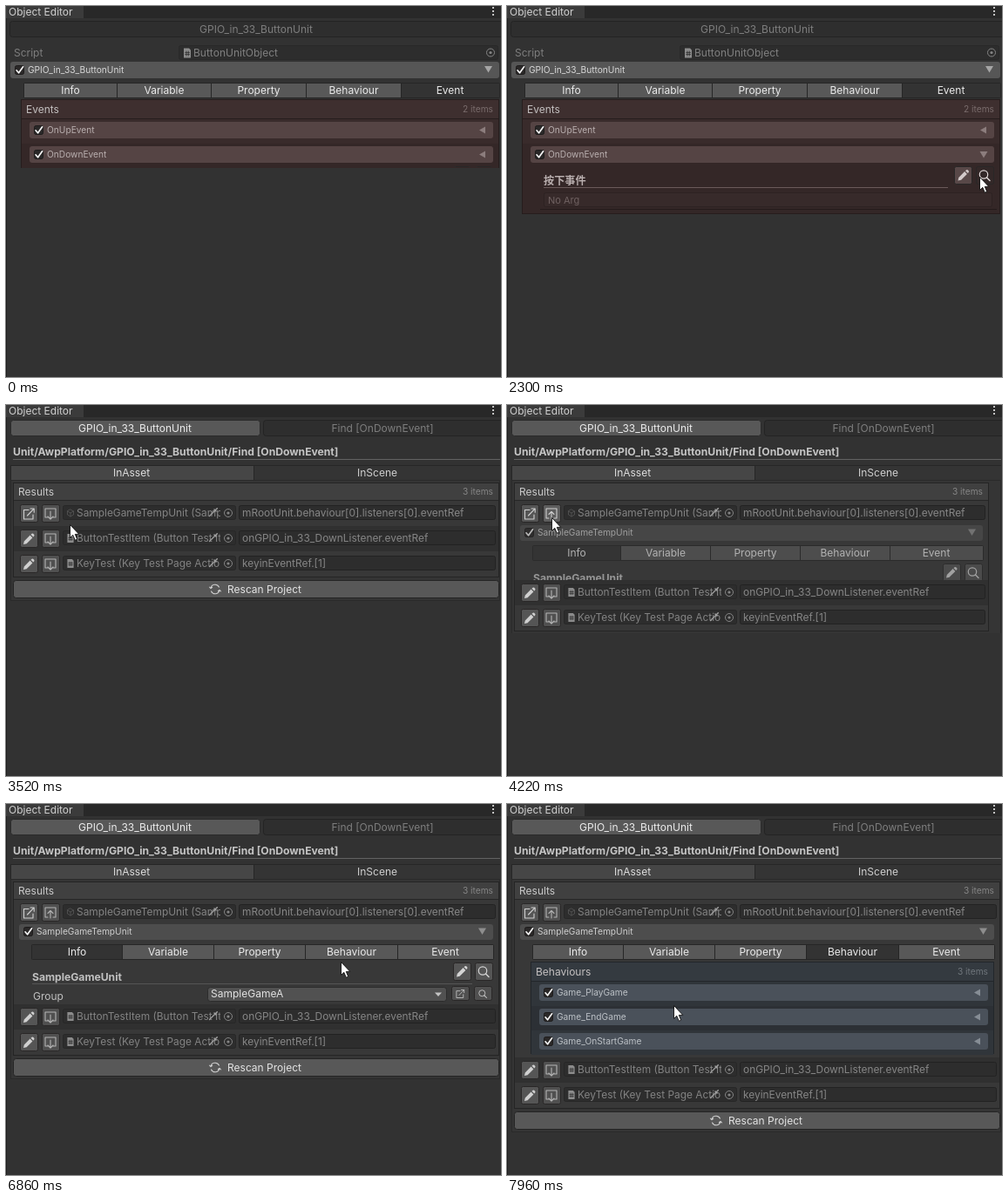
An HTML page for the animation above (8000 ms loop, 568x426 px).

```html
<!DOCTYPE html>
<html lang="en">
<head>
<meta charset="utf-8">
<title>Object Editor</title>
<style>
html, body { margin: 0; width: 100%; height: 100%; overflow: hidden; background: #323232; }
svg { display: block; }
#stage { width: 568px; height: 426px; font: 12px Inter, "Noto Sans CJK SC", "Noto Sans CJK", sans-serif; }
text { white-space: pre; }
</style>
</head>
<body>
<svg id="stage" viewBox="0 0 568 426"></svg>
<script>
const stage = document.getElementById('stage');
const LOOP = 8000, START = 578, STEP = 100.9;

const clamp = v => Math.max(0, Math.min(1, v));
const ramp = (u, from, span) => clamp((u - from) / span);

// Pointer way points: time, x, y
const TRACK = [
  [590, 557, 48], [690, 545, 88], [800, 518, 138], [900, 487, 169], [1500, 486, 169],
  [1600, 513, 183], [1700, 537, 195], [1800, 537, 195], [1900, 543, 196], [3010, 543, 196],
  [3110, 505, 190], [3220, 395, 172], [3320, 265, 156], [3420, 150, 143], [3520, 73, 137],
  [3620, 60, 134], [3820, 52, 129], [5030, 52, 129], [5135, 54, 129], [5240, 57, 130],
  [5340, 84, 135], [5540, 235, 142], [5740, 395, 122], [5840, 413, 113], [5940, 384, 111],
  [6140, 328, 114], [6340, 342, 105], [6550, 370, 145], [6750, 386, 178], [6852, 385, 181],
  [7060, 384, 171], [7760, 384, 171], [7862, 290, 204], [7963, 192, 231]
];

function pointerAt(u) {
  let i = 1;
  while (i < TRACK.length - 1 && TRACK[i][0] < u) i++;
  const [t0, x0, y0] = TRACK[i - 1], [t1, x1, y1] = TRACK[i];
  const k = ramp(u, t0, t1 - t0);
  return [Math.round(x0 + (x1 - x0) * k), Math.round(y0 + (y1 - y0) * k)];
}

// Basic shapes
const box = (x, y, w, h, fill, r = 0, line = '') =>
  line
    ? `<rect x="${x + .5}" y="${y + .5}" width="${w - 1}" height="${h - 1}" rx="${r}" fill="${fill}" stroke="${line}"/>`
    : `<rect x="${x}" y="${y}" width="${w}" height="${h}" rx="${r}" fill="${fill}"/>`;
const label = (x, y, s, fill, size = 12, more = '') =>
  `<text x="${x}" y="${y}" fill="${fill}" font-size="${size}" ${more}>${s}</text>`;
const mid = (x, y, s, fill) => label(x, y, s, fill, 12, 'text-anchor="middle"');
const right = (x, y, s, fill) => label(x, y, s, fill, 10.2, 'text-anchor="end"');
const bold = (x, y, s, fill) => label(x, y, s, fill, 12.15, 'font-weight="700"');
const move = (x, y, s) => `<g transform="translate(${x} ${y})">${s}</g>`;
const stroke = (d, c, w = 1.1) =>
  `<path d="${d}" fill="none" stroke="${c}" stroke-width="${w}" stroke-linecap="round" stroke-linejoin="round"/>`;
const solid = (d, c) => `<path d="${d}" fill="${c}"/>`;
const clip = (x, y, w, h, s) =>
  h <= 0 ? '' : `<svg x="${x}" y="${y}" width="${w}" height="${h}" viewBox="${x} ${y} ${w} ${h}">${s}</svg>`;

// Icons, centred on 0,0
const ICON = {
  pencil: c => solid('M-6 6L-5.2 2.4L1.6 -4.4L4.4 -1.6L-2.4 5.2ZM2.5 -5.3L3.6 -6.3Q4.4 -6.8 5.2 -6.2L6.2 -5.2Q6.8 -4.4 6.2 -3.6L5.3 -2.5Z', c),
  pen: c => stroke('M-4.5 4.5L2 -2', c, 1.3) + stroke('M1 -3L3 -1M3 -3L4.3 -4.3', c, 1.5),
  search: c => `<circle cx="-1" cy="-1" r="4.7" fill="none" stroke="${c}" stroke-width="1.2"/>` + stroke('M2.5 2.5L6 6', c, 1.4),
  link: c => stroke('M0 -4.5H-5.5V6H5V1M-1.5 2L6 -5.8M2 -6H6.2V-1.8', c),
  down: c => stroke('M-3 4H-6V-6H6V4H3M0 -3V6M-3 3L0 6.2L3 3', c),
  up: c => stroke('M-3 5H-6V-6H6V5H3M0 6V-2.5M-3 .5L0 -2.7L3 .5', c),
  target: c => `<circle r="4.5" fill="none" stroke="${c}"/><circle r="1.6" fill="${c}"/>`,
  script: c => solid('M-4 -5.5H2L4 -3.5V5.5H-4Z', c) + stroke('M-1 -2V3M1.3 -2V3M-2.3 -.6H2.5M-2.3 1.6H2.5', '#2d2d2d', .8),
  cube: c => stroke('M0 -4L3.5 -2V2L0 4L-3.5 2V-2ZM-3.5 -2L0 0L3.5 -2M0 0V4', c, .7),
  reload: c => stroke('M-5 -1.2A5 5 0 0 1 4.4 -2.4M5 1.2A5 5 0 0 1 -4.4 2.4M-6.4 -2.4L-5 -.8L-3.4 -2.2M6.4 2.4L5 .8L3.4 2.2', c)
};
const icon = (name, x, y, c, k = 1) => `<g transform="translate(${x} ${y}) scale(${k})">${ICON[name](c)}</g>`;
const button = (name, cx, cy, bg, c, w = 21, h = 21, k = 1) =>
  box(Math.round(cx - w / 2), Math.floor(cy - h / 2), w, h, bg, 2, '#292727') + icon(name, cx, cy, c, k);
const field = (x, y, w, line) => box(x, y, w, 17, '#2d2d2d', 2, line);

const foldOpen = (x, y, c) => solid(`M${x - 4.5} ${y - 3.5}h9l-4.5 7.5z`, c);
const foldShut = (x, y, c) => solid(`M${x + 3} ${y - 4}v8l-7 -4z`, c);
const check = (x, y) => box(x - 5.5, y - 5.5, 11, 11, '#2a2828', 2, '#1d1b1b') +
  stroke(`M${x - 3.5} ${y + .3}l2.6 3l5 -7`, '#f4f4f4', 1.7);

const TABS = ['Info', 'Variable', 'Property', 'Behaviour', 'Event'];
function tabs(x, y, w, active) {
  const cut = [0, .196, .395, .594, .794, 1].map(k => Math.round(x + w * k));
  return box(x - 1, y - 1, w + 2, 18, '#262626', 2) + TABS.map((s, i) =>
    box(cut[i], y, cut[i + 1] - cut[i] - (i < 4), 16, i === active ? '#333' : '#585858') +
    mid((cut[i] + cut[i + 1]) / 2 - .5, y + 12, s, '#eaeaea')).join('');
}

const RED = { line: '#261d1d', head: '#3e2f2f', odd: '#392b2b', even: '#342727', bar: '#554444', text: '#b9afaf', dim: '#7a6c6c', arrow: '#8c7d7d' };
const BLUE = { line: '#22262a', head: '#343a40', odd: '#30353a', even: '#2c3035', bar: '#4a515a', text: '#bcc1c6', dim: '#70767c', arrow: '#868d95' };

// Titled list of foldable entries
function list(x, y, w, h, title, items, c, openLast) {
  const end = x + w;
  return box(x, y, w, h, c.even, 0, c.line) +
    box(x + 1, y + 1, w - 2, 21, c.head) + box(x + 1, y + 22, w - 2, 1, c.line) +
    label(x + 6, y + 16, title, '#c4c0c0') + right(end - 7, y + 15, items.length + ' items', c.dim) +
    items.map((s, i) => {
      const top = y + 23 + i * 28, cy = top + 12.5;
      const fold = openLast && i === items.length - 1 ? foldOpen : foldShut;
      return box(x + 1, top, w - 2, 28, i % 2 ? c.even : c.odd) +
        box(x + 10, cy - 9.5, w - 17, 19, c.bar, 3) + check(x + 20.5, cy) +
        label(x + 30, cy + 3.5, s, c.text, 10.2) + fold(end - 19, cy, c.arrow);
    }).join('');
}

function windowBar() {
  return box(0, 0, 568, 426, '#323232') + box(0, 0, 568, 14, '#282828') +
    box(0, 0, 89, 14, '#3b3b3b') + box(0, 14, 1, 412, '#1f1f1f') +
    label(3, 11, 'Object Editor', '#d0d0d0') +
    [1, 5, 9].map(y => box(558, y, 2, 2, '#c4c4c4')).join('');
}

function unitPage(u) {
  const grow = Math.round(53 * ramp(u, 900, 395));
  const pressed = u > 2150, hover = u > 1850;
  const detail = bold(42, 205, '按下事件', '#b9afaf') +
    box(42, 208, 464, 1, '#6a5a5a') +
    button('pencil', 523.5, 194.5, '#584848', '#d2caca') +
    button('search', 548, 194.5, pressed ? '#332828' : '#584848', hover ? '#e2dada' : '#c4baba') +
    box(42, 214, 515, 17, '#372a2a', 2, '#2d2222') + label(47, 227, 'No Arg', '#6f6161', 11) +
    box(38, 233, 524, 1, '#241b1b');
  return box(4, 17, 568, 19, '#2e2e2e', 3, '#232323') +
    mid(287, 31, 'GPIO_in_33_ButtonUnit', '#7e7e7e') +
    label(9, 58, 'Script', '#7e7e7e') + field(198, 45, 367, '#292929') +
    icon('script', 208, 54, '#8c8c8c') + label(215, 58, 'ButtonUnitObject', '#808080') +
    icon('target', 556, 53.5, '#858585') +
    box(5, 64, 561, 19, '#565656', 3) + check(15.5, 73.5) +
    label(25, 77, 'GPIO_in_33_ButtonUnit', '#d8d8d8', 10.2) + foldOpen(553.5, 72.5, '#a6a6a6') +
    tabs(21, 89, 545, 4) +
    list(17, 107, 549, 79 + grow, 'Events', ['OnUpEvent', 'OnDownEvent'], RED, grow > 0) +
    clip(18, 183, 547, grow + 2, detail);
}

const ROWS = [
  ['link', 'cube', 'SampleGameTempUnit (Sample Game Temp Unit)', 'mRootUnit.behaviour[0].listeners[0].eventRef'],
  ['pencil', 'script', 'ButtonTestItem (Button Test Item)', 'onGPIO_in_33_DownListener.eventRef'],
  ['pencil', 'script', 'KeyTest (Key Test Page Action)', 'keyinEventRef.[1]']
];

function resultRow(i, dy, edge, open, hover) {
  const [act, kind, name, ref] = ROWS[i], y = 110 + 29 * i + dy;
  return box(9, y, edge - 10, 29, i % 2 ? '#303030' : '#383838') +
    button(act, 26, y + 15, '#555', '#d0d0d0') +
    button(open ? 'up' : 'down', 51, y + 15, hover ? '#5e5e5e' : '#505050', hover ? '#d0d0d0' : '#b4b4b4') +
    field(65, y + 5, 199, '#272727') +
    icon(kind, 74, y + 14, kind === 'cube' ? '#5c5c5c' : '#8c8c8c', kind === 'cube' ? 1 : .9) +
    clip(81, y, 165, 29, label(81, y + 18, name, '#838383', 11.9)) +
    icon('pen', 238, y + 13, '#a0a0a0') + icon('target', 255, y + 14, '#858585') +
    field(267, y + 5, edge - 271, '#222') + label(271, y + 18, ref, '#868686', 11.9);
}

function infoPane(end) {
  return bold(30, 203, 'SampleGameUnit', '#c0c0c0') + box(30, 206, end - 54, 1, '#555') +
    button('pencil', end - 36, 192.5, '#555', '#d4d4d4') + button('search', end - 11, 192.5, '#555', '#d4d4d4') +
    label(31, 225, 'Group', '#c0c0c0') +
    box(231, 210, end - 284, 17, '#515151', 3, '#2c2c2c') + label(235, 222, 'SampleGameA', '#e2e2e2') +
    solid(`M${end - 67} 216.5h8l-4 4.5z`, '#c4c4c4') +
    button('link', end - 38, 218, '#505050', '#c8c8c8', 21, 17, .75) +
    button('search', end - 12, 218, '#505050', '#c8c8c8', 21, 17, .75);
}

const unfold = u => Math.round(91 * ramp(u, 3966, 382));

function findPage(u) {
  const opening = u > 3950 && u < 4400;
  const edge = opening ? 553 : 566, end = edge - 7;
  const swap = ramp(u, 7200, 350);
  const open = u > 3900, hover = u > 3780 && u < 5300;
  const dy = unfold(u) + Math.round(61 * swap);
  const slide = Math.round(532 * swap);

  const info = swap < 1 ? move(-slide, 0, infoPane(end)) : '';
  const behaviours = swap > 0 ? move(532 - slide, 0,
    list(27, 181, 532, 106, 'Behaviours', ['Game_PlayGame', 'Game_EndGame', 'Game_OnStartGame'], BLUE)) : '';
  const editor = box(15, 138, end - 15, 18, '#4d4d4d', 3) + check(25.5, 146.5) +
    label(35, 150, 'SampleGameTempUnit', '#cecece', 10.2) + foldOpen(end - 12.5, 146, '#8e8e8e') +
    tabs(30, 162, end - 30, swap > 0 ? 3 : 0) +
    clip(27, 180, end - 26, 110, info + behaviours);

  const table = box(5, 86, 562, 139 + dy, '#353535', 0, '#2a2a2a') +
    box(8, 89, edge - 8, 109 + dy, '#383838', 0, '#242424') +
    box(9, 90, edge - 10, 19, '#404040') + box(9, 109, edge - 10, 1, '#272727') +
    label(14, 104, 'Results', '#cacaca') + right(end, 103, '3 items', '#858585') +
    resultRow(0, 0, edge, open, hover) +
    clip(9, 136, edge - 10, dy + 3,
      box(9, 136, 560, 160, '#383838') + `<g opacity="${unfold(u) / 91}">${editor}</g>`) +
    resultRow(1, dy, edge) + resultRow(2, dy, edge) +
    box(8, 201 + dy, edge - 8, 21, '#585858', 3, '#242424') +
    icon('reload', 240, 211.5 + dy, '#d0d0d0') + label(254, 216 + dy, 'Rescan Project', '#e4e4e4');
  // While opening, the view height trails the content by one step
  const view = opening ? 224 + unfold(u - 101) : 426;

  return box(5, 17, 287, 19, '#585858', 3, '#2a2a2a') + mid(148, 31, 'GPIO_in_33_ButtonUnit', '#ebebeb') +
    box(295, 17, 280, 19, '#2e2e2e', 3, '#232323') + mid(432, 31, 'Find [OnDownEvent]', '#7e7e7e') +
    bold(8, 58, 'Unit/AwpPlatform/GPIO_in_33_ButtonUnit/Find [OnDownEvent]', '#c4c4c4') +
    box(8, 62, 559, 1, '#626262') +
    box(5, 69, 562, 18, '#262626') + box(6, 70, 278, 16, '#464646') + box(285, 70, 282, 16, '#343434') +
    mid(144, 82, 'InAsset', '#dedede') + mid(426, 82, 'InScene', '#d0d0d0') +
    clip(0, 86, 568, view - 86, table) +
    (u > 5100 && u < 5300
      ? box(1, 138, 100, 25, '#2b2b2b', 2, '#1c1c1c') + label(6, 155, 'Stop Edit Object', '#cacaca') : '');
}

const pointer = ([x, y]) => move(x - 1, y,
  '<path d="M.5 .5V15.5L3.8 12.3L6.3 18.2L8.7 17.2L6.3 11.4H10.8Z" fill="#fff" stroke="#111" stroke-width=".9"/>');

let last;
function draw(now) {
  const n = Math.max(-1, Math.floor((now % LOOP - START) / STEP));
  if (n !== last) {
    last = n;
    const u = 590 + n * 101;
    stage.innerHTML = windowBar() + (u < 2350 ? unitPage(u) : findPage(u)) +
      (n < 0 ? '' : pointer(pointerAt(u)));
  }
  requestAnimationFrame(draw);
}
draw(performance.now());
</script>
</body>
</html>
```
